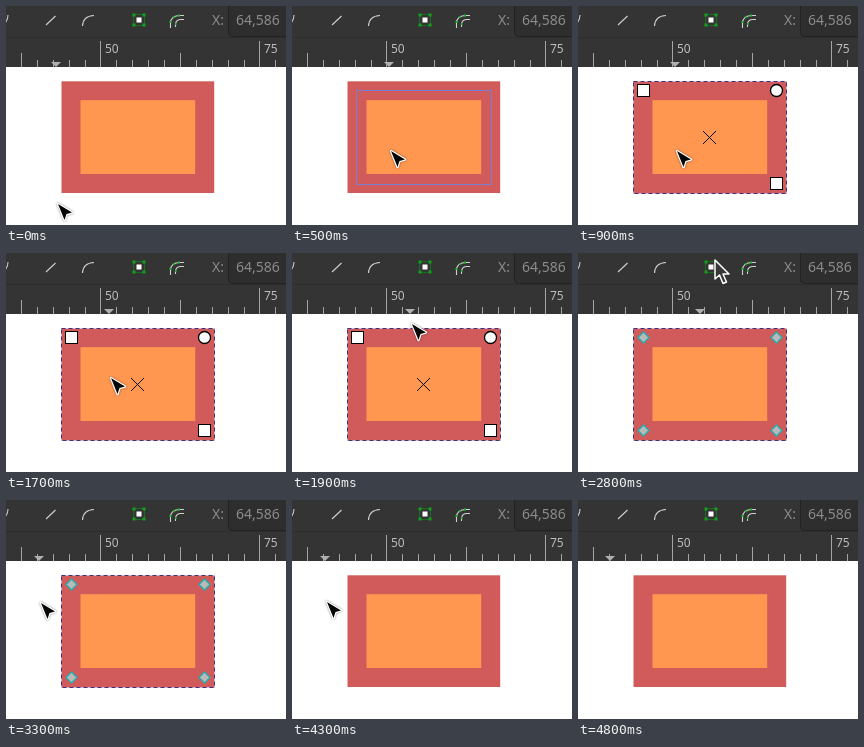
An HTML page for the animation above (5.2 s loop, 280 px wide and 219 px high).

```html
<!DOCTYPE html>
<html lang="en">
<head>
<meta charset="utf-8">
<title>Object to path</title>
<style>
  html, body { margin: 0; width: 100%; height: 100%; overflow: hidden; background: #fff; }
  svg { display: block; width: 280px; height: 219px; }
  text { font-family: "Noto Sans", "Open Sans", sans-serif; }
  #arrow { filter: drop-shadow(0 0 1px #0007); }
</style>
</head>
<body>
<svg viewBox="0 0 280 219" fill="none">
  <rect width="280" height="219" fill="#fff"/>
  <rect width="280" height="61" fill="#343434"/>
  <path d="M0 31.5H280" stroke="#2d2d2d"/>
  <rect id="button" x="116.5" y="-4.5" width="33" height="35" rx="3" fill="#2e2e2e" stroke="#232323"/>

  <g stroke="#d0d0d0" stroke-width="1.1">
    <path d="M-1 17Q2 14 2 9"/>
    <path d="M40 19L49.5 10"/>
    <path d="M76.5 20Q77 10 88 9.5"/>
    <path d="M164.5 22V17Q165 9.5 174 9.5H178M169.5 21V18Q170 14 174 13.5H178"/>
  </g>
  <rect x="127.500" y="8.500" width="11" height="11" stroke="#1c6b22"/>
  <path d="M126.500 7.500h3v3h-3zM136.500 7.500h3v3h-3zM126.500 17.500h3v3h-3zM136.500 17.500h3v3h-3z" fill="#12a01e"/>
  <rect x="130.500" y="11.500" width="5" height="5" fill="#fff"/>
  <path d="M163 16h3M167 10l2 2M173 8v3M169 18h2" stroke="#12a01e" stroke-width="1.500"/>

  <rect x="222.500" y="-5.500" width="70" height="36" rx="4" fill="#2e2e2e" stroke="#222"/>
  <g fill="#8c8c8c" font-size="14">
    <text x="206" y="19">X:</text>
    <text x="230" y="19">64,586</text>
  </g>

  <path id="ticks" stroke="#a5a5a5"/>
  <g fill="#bcbcbc" font-size="12">
    <text x="99" y="47">50</text>
    <text x="258" y="47">75</text>
  </g>
  <path id="marker" d="M-5 56H5L0 61Z" fill="#b0b0b0"/>

  <rect x="55.500" y="75.300" width="152.700" height="111.700" fill="#d15a5b"/>
  <rect x="74.500" y="94.200" width="114.700" height="73.800" fill="#ff9751"/>
  <rect id="outline" x="64.500" y="84.500" width="135" height="94" stroke="#7880cf"/>
  <g id="dashes">
    <rect x="55.500" y="75.500" width="153" height="112" stroke="#dcb8c4"/>
    <rect x="55.500" y="75.500" width="153" height="112" stroke="#41307c" stroke-dasharray="4 3"/>
  </g>
  <g id="handles" fill="#fff" stroke="#000">
    <rect x="59.500" y="78.500" width="12" height="12"/>
    <rect x="192.500" y="171.500" width="12" height="12"/>
    <circle cx="198.500" cy="84.500" r="6" stroke-width="1.300"/>
    <path d="M125 125L138 138M138 125L125 138"/>
  </g>
  <g id="nodes" fill="#b9b9b9" stroke="#1fb0b0" stroke-width="1.300"></g>

  <g id="cursor" stroke-linejoin="round">
    <path id="arrow" d="M2 2L16 10.500L10.500 12L8.500 18Z" fill="#050505" stroke="#fff" stroke-width="2.400" paint-order="stroke"/>
    <path id="pointer" d="M1 1V20L5.500 16L9 24.500L12.500 23L9 15H15Z" fill="#383838" stroke="#fff" stroke-width="1.500"/>
  </g>
</svg>
<script>
const LOOP = 5200, STEP = 100, RULER_BOTTOM = 61, MARKER_MAX = 122;
const el = id => document.getElementById(id);

const home = { x: 50, y: 196 };
const moves = [
  { from: 100, to: 500, x: 97, y: 143 },
  { from: 1600, to: 2100, x: 136, y: 6 },
  { from: 3000, to: 3300, x: 33, y: 101 },
  { from: 4290, to: 4800, x: 32, y: -40 }
];

const visible = {
  outline: t => t >= 500 && t < 900,
  dashes: t => t >= 800 && t < 3800,
  handles: t => t >= 800 && t < 2400,
  nodes: t => t >= 2400 && t < 3800,
  button: t => t >= 2300 && t < 2800
};

const show = (id, on) => el(id).setAttribute("visibility", on ? "visible" : "hidden");
const place = (id, x, y) => el(id).setAttribute("transform", `translate(${x} ${y})`);
const ease = p => Math.min(1, Math.max(0, p)) ** 1.2;

function cursorAt(t) {
  return moves.reduce((pos, { from, to, x, y }) => {
    const p = ease((t - from) / (to - from));
    return { x: pos.x + (x - pos.x) * p, y: pos.y + (y - pos.y) * p };
  }, home);
}

function tickMark(i) {
  const x = Math.ceil(94 + i * 15.9) + 0.5;
  const length = i % 10 === 0 ? 26 : i % 5 === 0 ? 14 : 7;
  return `M${x} ${RULER_BOTTOM}v${-length}`;
}
el("ticks").setAttribute("d", Array.from({ length: 17 }, (_, i) => tickMark(i - 5)).join(""));

el("nodes").innerHTML = [65.5, 198.5].flatMap(x => [84.5, 177.5].map(y =>
  `<path d="M${x} ${y - 5.5}l5.5 5.5l-5.5 5.5l-5.5 -5.5Z"/>`)).join("");

function draw(time) {
  const t = Math.floor(time % LOOP / STEP) * STEP;
  const { x, y } = cursorAt(t);
  place("cursor", Math.round(x), Math.round(y));
  place("marker", Math.min(Math.round(x), MARKER_MAX), 0);
  show("arrow", y >= RULER_BOTTOM);
  show("pointer", y < RULER_BOTTOM);
  for (const id in visible) show(id, visible[id](t));
}

const start = performance.now();
function tick() {
  draw(performance.now() - start);
  requestAnimationFrame(tick);
}
tick();
</script>
</body>
</html>
```
